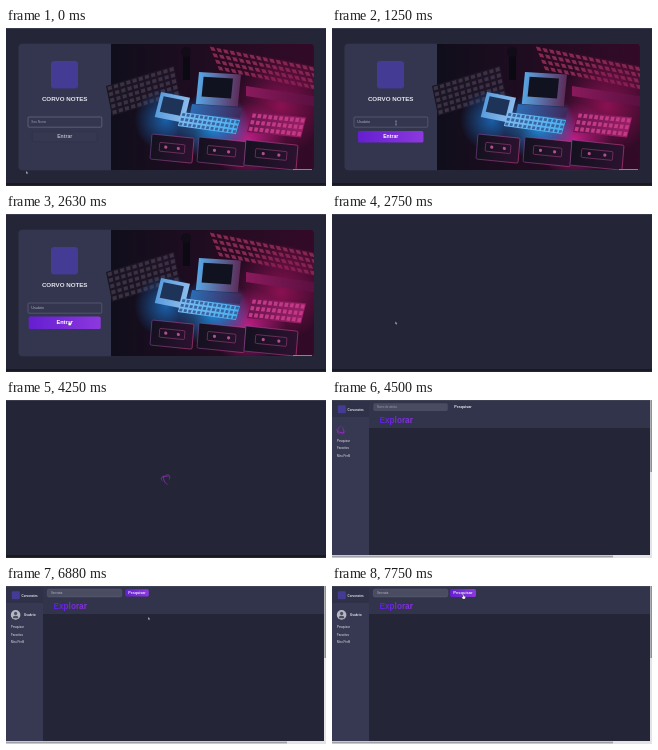
Animation of 320 by 158 pixels, one loop 8000 ms. Source, as an HTML page with a canvas:

```html
<!DOCTYPE html>
<html lang="pt">
<head>
<meta charset="utf-8">
<title>Corvo Notes</title>
<style>
  html, body { margin: 0; width: 100%; height: 100%; overflow: hidden; background: #242637; }
  canvas, svg { position: absolute; left: 0; top: 0; width: 320px; height: 158px; }
  text { font-family: "Liberation Sans", Arial, sans-serif; fill: #e6e6ee; }
  .b { font-weight: 700; }
  .m { text-anchor: middle; }
  #links { font-size: 2.9px; }
</style>
</head>
<body>
<canvas id="stage"></canvas>
<svg viewBox="0 0 320 158">
  <defs>
    <linearGradient id="violet">
      <stop offset="0" stop-color="#5a1fe0"/>
      <stop offset="1" stop-color="#8a35d6"/>
    </linearGradient>
  </defs>
  <g id="login">
    <text class="b m" x="58.7" y="73.3" font-size="6.2">CORVO NOTES</text>
    <text id="user" x="25.3" y="95.4"></text>
    <text id="enter" class="b m" x="58.7" y="110.3">Entrar</text>
  </g>
  <g id="home">
    <text class="b" x="15.6" y="10.6" font-size="2.9">Corvonotes</text>
    <g id="links">
      <text x="5" y="41.5">Pesquisar</text>
      <text x="5" y="49">Favoritos</text>
      <text x="5" y="56.5">Meu Perfil</text>
    </g>
    <text id="name" class="b" x="18" y="30.2" font-size="3.1">Usuário</text>
    <text id="query" x="45" y="8" font-size="2.8"></text>
    <text id="find" class="b m" x="131" y="8.3">Pesquisar</text>
    <text class="b" x="47.6" y="23.2" font-size="8.2" style="fill:url(#violet)">Explorar</text>
  </g>
  <g id="pointer">
    <path id="arrow" d="M0 0V2.9L.8 2.3 1.3 3.3 1.8 3 1.3 2.1H2.2Z" fill="#9fa0b0"/>
    <path id="beam" d="M-.8 -2H.8M0 -2V2M-.8 2H.8" fill="none" stroke="#b4b5c2" stroke-width=".5"/>
    <path id="hand" d="M-.5 -.5H.4V1.1L2 1.6V3L1.5 4H-.6L-1.7 2.2 -1.2 1.7 -.5 2.2Z" fill="#fff" stroke="#222" stroke-width=".25"/>
  </g>
</svg>
<script>
const W = 320, H = 158, LOOP = 8000, TICK = 125;
const CUT_LOADING = 2750, CUT_HOME = 4500, LOADED = 5875;
const PANEL = '#34364f', LOGO = '#433b94';
const $ = id => document.getElementById(id);
const canvas = $('stage'), ctx = canvas.getContext('2d');
const ratio = window.devicePixelRatio || 1;
canvas.width = W * ratio;
canvas.height = H * ratio;

const show = (id, on) => { $(id).style.display = on ? '' : 'none'; };
const ramp = (t, a, b) => Math.min(1, Math.max(0, (t - a) / (b - a)));
const ease = p => p * p * (3 - 2 * p);
const glide = (t, a, b) => ease(ramp(t, a, b));
const mix = (a, b, p) => a + (b - a) * p;

function rect(x, y, w, h, fill) {
  ctx.fillStyle = fill;
  ctx.fillRect(x, y, w, h);
}

function box(x, y, w, h, r, fill, line) {
  ctx.beginPath();
  ctx.roundRect(x, y, w, h, r);
  if (fill) { ctx.fillStyle = fill; ctx.fill(); }
  if (line) { ctx.strokeStyle = line; ctx.lineWidth = 0.5; ctx.stroke(); }
}

function disc(x, y, r, fill) {
  ctx.beginPath();
  ctx.arc(x, y, r, 0, Math.PI * 2);
  ctx.fillStyle = fill;
  ctx.fill();
}

function across(x, w, from, to) {
  const g = ctx.createLinearGradient(x, 0, x + w, 0);
  g.addColorStop(0, from);
  g.addColorStop(1, to);
  return g;
}

function glow(x, y, r, color) {
  const g = ctx.createRadialGradient(x, y, 0, x, y, r);
  g.addColorStop(0, color);
  g.addColorStop(1, color + '00');
  rect(x - r, y - r, 2 * r, 2 * r, g);
}

// Sheared block in a two-tone fade; detail draws inside its own axes
function slab(x, y, w, h, lean, slope, from, to, detail) {
  ctx.save();
  ctx.transform(1, slope, lean, 1, x, y);
  rect(0, 0, w, h, across(0, w, from, to));
  if (detail) detail(w, h);
  ctx.restore();
}

const keys = (cols, rows, color) => (w, h) => {
  for (let i = 0; i < cols * rows; i++)
    rect((i % cols + 0.2) * w / cols, (Math.floor(i / cols) + 0.2) * h / rows,
      0.65 * w / cols, 0.6 * h / rows, color);
};

const inset = color => (w, h) => rect(w * 0.12, h * 0.14, w * 0.7, h * 0.62, color);

function tape(w, h) {
  box(0, 0, w, h, 1.5, null, across(0, w, '#8a4fa0', '#e0468e'));
  box(w * 0.2, h * 0.3, w * 0.6, h * 0.35, 1, null, '#a84886');
  for (const k of [0.35, 0.65]) disc(w * k, h * 0.47, 1.6, '#b0508c');
}

function photo() {
  rect(105, 16, 203, 126, across(105, 203, '#100e1b', '#330a28'));
  slab(100, 58, 68, 30, 0.2, -0.3, '#191622', '#1f1426', keys(11, 5, '#3b3044'));
  slab(202, 17, 112, 26, 0.4, 0.2, '#260a20', '#4a0c34', keys(17, 4, '#84294f'));
  glow(275, 78, 48, '#8a1152');
  glow(242, 112, 38, '#c01c84');
  glow(160, 92, 32, '#1a5fa8');
  glow(208, 98, 36, '#1f8fe4');
  rect(177, 22, 7, 30, '#0b0912');
  disc(180, 24, 5, '#120c18');
  slab(240, 58, 70, 10, 0, 0.15, '#8a1a5c', '#5a0f40');
  slab(246, 84, 54, 20, -0.25, 0.1, '#6a1450', '#9a1f66', keys(10, 3, '#c23a84'));
  slab(155, 64, 29, 25, -0.25, 0.2, '#5a9cdc', '#8cbcec', inset('#1d3358'));
  slab(193, 44, 42, 32, -0.1, 0.06, '#58a6e6', '#5c2c58', inset('#10131f'));
  slab(186, 76, 50, 10, -0.2, 0.08, '#2c6cb4', '#40285a');
  slab(176, 84, 58, 14, -0.3, 0.14, '#7cbcf0', '#48b0f0', keys(13, 3, '#3a64a0'));
  for (let i = 0; i < 3; i++)
    slab(146 + i * 47, 106 + i * 3, 42 + i * 5, 25, -0.08, 0.1, '#14111f', '#2c1230', tape);
  rect(287, 141, 19, 1, '#8f7f98');
}

// Three tilted rings, each a tapered half arc that turns once a second
function loader(x, y, r, t) {
  const rad = Math.PI / 180, steps = 14;
  ctx.strokeStyle = '#9a2bc4';
  [[35, -45], [50, 10], [35, 55]].forEach(([pitch, yaw], k) => {
    const mid = (90 - 90 * k) * rad + t / 1000 * Math.PI * 2;
    const at = a => [
      x + r * Math.cos(a) * Math.cos(yaw * rad),
      y + r * (Math.sin(a) * Math.cos(pitch * rad) + Math.cos(a) * Math.sin(yaw * rad) * Math.sin(pitch * rad) * -Math.sign(k - 3))
    ];
    for (let i = 0; i < steps; i++) {
      const s = i / steps - 0.5, a = mid + s * Math.PI;
      ctx.beginPath();
      ctx.moveTo(...at(a));
      ctx.lineTo(...at(a + Math.PI / steps));
      ctx.lineWidth = 0.15 + 0.75 * Math.cos(s * Math.PI);
      ctx.stroke();
    }
  });
}

function button(x, y, w, h) {
  box(x - w / 2, y - h / 2, w, h, 1.6, across(x - w / 2, w, '#651fd0', '#8c38de'));
}

function fillField(id, value, hint) {
  $(id).textContent = value || hint;
  $(id).style.fill = value ? '#b4b5c4' : '#9c9db0';
}

function backdrop() {
  rect(0, 0, W, H, '#242637');
  rect(0, 0, W, 1, '#3a3c4e');
  rect(0, 155, W, 2, '#181922');
}

function login(t) {
  const typed = t >= 1250;
  const scale = 1 + 0.1 * glide(t, 1875, 2250);
  ctx.save();
  ctx.beginPath();
  ctx.roundRect(12.5, 15.7, 295.5, 126.6, 4);
  ctx.clip();
  rect(12, 15, 93, 128, PANEL);
  photo();
  ctx.restore();
  box(45, 33, 27, 27.5, 3, LOGO);
  box(22, 89, 73.8, 10.2, 1, PANEL, t < 750 ? '#82839a' : '#707188');
  if (typed) button(58.7, 108.8, 65.5 * scale, 11.4 * scale);
  else box(26.2, 103.8, 65, 10, 1.5, '#363851', '#2d2f45');

  fillField('user', typed ? 'Usuário' : '', t < 750 ? 'Seu Nome' : '');
  $('user').setAttribute('font-size', typed ? 3.7 : 3.2);
  $('enter').setAttribute('font-size', 5.1 * scale);
  $('enter').style.fill = typed ? '#fff' : '#b4b5c4';
}

function home(t) {
  const loaded = t >= LOADED, ready = t >= 6625;
  const scale = 1 + 0.1 * glide(t, 7375, 7750);
  rect(37, 0, 281, 28, '#32344c');
  rect(0, 0, 37, 17, '#2f3149');
  rect(0, 17, 37, 138, '#373952');
  rect(0, 0, W, 1, '#3f4155');
  rect(318, 0, 2, H, '#e4e4e6');
  rect(318.4, 0, 1.6, 72, '#8f9096');
  rect(0, 155, W, 3, '#e4e4e6');
  rect(0, 155.6, 281, 1.8, '#a0a1a7');
  box(5.8, 5.2, 8, 8, 1, LOGO);

  if (loaded) {
    disc(9.6, 28.9, 4.8, '#b6b7c0');
    disc(9.6, 27.4, 1.6, '#4b4d60');
    box(6.8, 29.8, 5.6, 2.4, [2.4, 2.4, 0, 0], '#4b4d60');
  } else loader(9, 29.5, 4.8, t + 750);

  box(41.3, 3.2, 74.5, 7.7, 1.6, '#4a4c61', t >= 6375 ? '#5e6076' : null);
  if (ready) button(131, 6.9, 23.6 * scale, 7.3 * scale);

  show('name', loaded);
  $('links').setAttribute('transform', `translate(0 ${loaded ? 0.6 : 0})`);
  const word = 'Serenata';
  fillField('query', word.slice(0, Math.ceil(word.length * ramp(t, 6250, 6875))), 'Nome do artista');
  $('find').setAttribute('font-size', 3.7 * scale);
}

function pointer(t) {
  let kind = '', x = 0, y = 0;
  if (t < 1625) {
    const p = glide(t, 0, 500);
    kind = t < 500 ? 'arrow' : 'beam';
    x = mix(20, 64, p);
    y = mix(143, 95, p);
  } else if (t < 3000) {
    y = mix(95, 107.4, glide(t, 1625, 2250));
    x = 63.3;
    kind = t >= CUT_LOADING ? 'arrow' : y < 100 ? 'beam' : 'hand';
  } else if (t >= LOADED && t < 6000) {
    kind = 'beam'; x = 85.5; y = 5;
  } else if (t >= 6625) {
    const p = glide(t, 7125, 7750);
    x = mix(142, 131.4, p);
    y = mix(31, 9, p);
    kind = y < 11 ? 'hand' : 'arrow';
  }
  for (const id of ['arrow', 'beam', 'hand']) show(id, id === kind);
  $('pointer').setAttribute('transform', `translate(${x} ${y})`);
}

function draw(t) {
  const inLogin = t < CUT_LOADING, inHome = t >= CUT_HOME;
  ctx.setTransform(ratio, 0, 0, ratio, 0, 0);
  backdrop();
  show('login', inLogin);
  show('home', inHome);
  if (inLogin) login(t);
  else if (inHome) home(t);
  else if (t > CUT_LOADING) loader(160.2, 79.5, 5, t + 350);
  pointer(t);
}

let last = -1;
function frame() {
  const t = Math.floor(performance.now() % LOOP / TICK) * TICK;
  if (t !== last) draw(last = t);
  requestAnimationFrame(frame);
}
frame();
</script>
</body>
</html>
```
